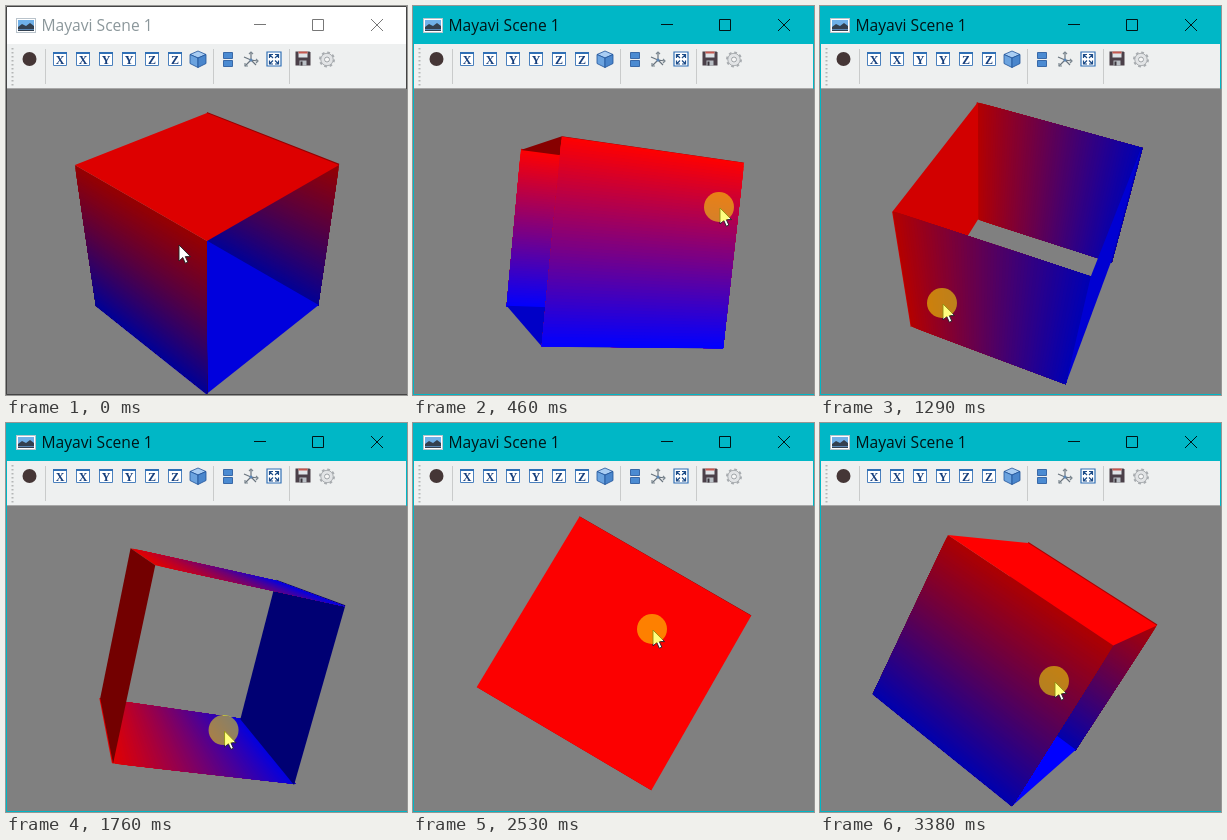
An HTML page with a canvas that plays this animation: 401x389 px, repeating every 3.46 s.

```html
<!DOCTYPE html>
<html lang="en">
<head>
<meta charset="utf-8">
<title>Mayavi Scene 1</title>
<style>
  html, body { margin: 0; width: 100%; height: 100%; overflow: hidden; }
  #win { position: relative; width: 401px; height: 389px; --edge: #444; --bar: #fff; --text: #8b979b; --ctl: #777; }
  #win.active { --edge: #00b7c6; --bar: #00b7c6; --text: #001416; --ctl: #001416; }
  canvas, svg { position: absolute; left: 0; top: 0; display: block; }
  .title { font: 15.6px "Open Sans", "Noto Sans", sans-serif; fill: var(--text); }
  .axis { font: bold 12px "Liberation Serif", "Noto Serif", serif; fill: #173f7c; text-anchor: middle; }
</style>
</head>
<body>
<div id="win">
  <canvas width="401" height="389"></canvas>
  <svg width="401" height="389" viewBox="0 0 401 389">
    <defs>
      <g id="axisBox">
        <rect x="-7" y="-7" width="14" height="14" fill="#fff"/>
        <path d="M-6.500 -6.500H6.500V6.500H-6.500Z" fill="none" stroke="#4a80bd"/>
        <path d="M-7 -6H7" stroke="#2f6fb5" stroke-width="2"/>
      </g>
    </defs>
    <rect width="401" height="38" style="fill:var(--bar)"/>
    <rect y="38" width="401" height="45" fill="#eef0f0"/>
    <path d="M0 82.500H401" stroke="#a8a8a8"/>

    <g>
      <rect x="10.500" y="12.500" width="19" height="14" fill="#fff" stroke="#b9c3cb"/>
      <rect x="12" y="14" width="16" height="11" fill="#6fb0e8"/>
      <path d="M12 21l4-3 4 2 4-3 4 3v5H12z" fill="#33404f"/>
      <path d="M12 23.500h16" stroke="#5a87b5"/>
    </g>
    <text class="title" x="35.500" y="25">Mayavi Scene 1</text>
    <path d="M248 18.500H260M306.500 13.500h11v11h-11zM365 13l12 12M377 13l-12 12" fill="none" style="stroke:var(--ctl)"/>

    <path d="M6.500 42V81" stroke="#b4b6b6" stroke-width="2" stroke-dasharray="1.500 2.500"/>
    <path d="M39.500 43V78M207.500 43V78M283.500 43V78" stroke="#c9cbcb"/>
    <circle cx="23.500" cy="53" r="7" fill="#453636"/>
    <g id="axes"></g>

    <g stroke="#20549a" stroke-width=".8" stroke-linejoin="round">
      <path d="M192 45l8 3.500-8 3.500-8-3.500z" fill="#a9cdf3"/>
      <path d="M184 48.500l8 3.500v9.500l-8-4z" fill="#6ba3df"/>
      <path d="M200 48.500l-8 3.500v9.500l8-4z" fill="#4a86cc"/>
      <path d="M217.500 46.500h9v6h-9zM217.500 54.500h9v6h-9z" fill="#4b8bd2"/>
    </g>
    <g stroke="#6a757f" stroke-width="1.200" fill="none">
      <path d="M245 46v8l7 1M245 54l-6 6M245 54l-7-3M245 54l5 5"/>
      <path d="M243 48l2-2 2 2M250 53l2 2-2 2M239 57v3h3" stroke="#7b8790"/>
      <circle cx="245" cy="54" r="1.500" fill="#5a85b5" stroke="none"/>
    </g>
    <path d="M261 46h14v14h-14z" fill="#fff" stroke="#2f6fb5" stroke-width="1.200"/>
    <path d="M263.500 52v-3.500h3.500M269 48.500h3.500V52M272.500 54.500V58H269M267 58h-3.500v-3.500M264 49l3 3M272 49l-3 3M272 57.500l-3-3M264 57.500l3-3" fill="none" stroke="#1d4c88" stroke-width="1.200"/>
    <g transform="translate(-.5 -.5)">
      <path d="M290 46h14l1 1v13h-15z" fill="#4b4049"/>
      <path d="M293 46h9v6h-9z" fill="#dfe4e8"/>
      <path d="M293 46h9v2h-9z" fill="#c4574e"/>
      <path d="M294 55h7v5h-7z" fill="#b9bfc5"/>
      <path d="M295 56h2v4h-2z" fill="#3a343b"/>
    </g>
    <g fill="none">
      <circle cx="321" cy="53.500" r="7" stroke="#a8acb0" stroke-width="2" stroke-dasharray="2.750"/>
      <circle cx="321" cy="53.500" r="4.600" stroke="#e2e4e6" stroke-width="3"/>
      <circle cx="321" cy="53.500" r="6.200" stroke="#a9adb0"/>
      <circle cx="321" cy="53.500" r="2.500" fill="#f5f5f5" stroke="#9da2a6"/>
    </g>

    <g id="pointer">
      <path d="M0 0V16L3.800 12.500L6.300 18.200L8.800 17.100L6.300 11.600H11.500Z" fill="#fff" stroke="#222" stroke-width=".9"/>
      <circle id="halo" cx="-1" cy="-1" r="15" fill="#ff0" fill-opacity=".5"/>
    </g>
    <path d="M400.500 83V.5H.5V388.500H401" fill="none" style="stroke:var(--edge)"/>
  </svg>
</div>
<script>
const LOOP = 3460, STEPS = 45;
const CX = 201, CY = 235.2, FOCAL = 571, DIST = 6.69, BANDS = 64;
const LIP = 1.012; // far walls reach slightly past the near ones

// step, orientation (w x y z), pointer tip
const KEYS = [
  [0, 0.340, -0.176, -0.425, -0.8205, 173, 239],
  [6, 0.575, -0.5835, -0.3626, -0.4435, 307, 202],
  [12, 0.868, -0.1127, -0.1179, -0.4693, 312, 311],
  [17, 0.525, 0.2096, -0.7473, -0.3496, 123, 298],
  [26, 0.422, 0.4256, -0.189, -0.7796, 268, 302],
  [33, 0.497, -0.0214, -0.0283, -0.8669, 240, 207],
  [44, 0.304, -0.4476, -0.3567, -0.7587, 235, 259]
];

// direction and strength of the lights in view space
const LIGHTS = [
  [0.5, 0.707, 0.5, 1],
  [-0.75, -0.5, 0.433, 0.6],
  [0.75, -0.5, 0.433, 0.5]
];

const win = document.getElementById('win');
const pointer = document.getElementById('pointer');
const halo = document.getElementById('halo');
const ctx = document.querySelector('canvas').getContext('2d');

document.getElementById('axes').innerHTML = [...'XXYYZZ'].map((c, i) =>
  `<g transform="translate(${54 + 23 * i} 53)"><use href="#axisBox"/><text class="axis" y="5">${c}</text></g>`
).join('');

function slope(i, c) {
  const a = KEYS[Math.max(i - 1, 0)], b = KEYS[Math.min(i + 1, KEYS.length - 1)];
  return (b[c] - a[c]) / (b[0] - a[0]);
}

// Hermite spline through the keys
function sample(step) {
  let i = 0;
  while (i < KEYS.length - 2 && step >= KEYS[i + 1][0]) i++;
  const a = KEYS[i], b = KEYS[i + 1], span = b[0] - a[0];
  const u = (step - a[0]) / span, v = 1 - u;
  return a.slice(1).map((p, k) => {
    const c = k + 1;
    return v * v * (1 + 2 * u) * p + u * u * (3 - 2 * u) * b[c]
      + span * u * v * (v * slope(i, c) - u * slope(i + 1, c));
  });
}

// object axes in view space
function axesOf(q) {
  const n = Math.hypot(...q);
  const [w, x, y, z] = q.map(v => v / n);
  return [
    [1 - 2 * (y * y + z * z), 2 * (x * y + w * z), 2 * (x * z - w * y)],
    [2 * (x * y - w * z), 1 - 2 * (x * x + z * z), 2 * (y * z + w * x)],
    [2 * (x * z + w * y), 2 * (y * z - w * x), 1 - 2 * (x * x + y * y)]
  ];
}

function project(axes, p) {
  const [x, y, z] = [0, 1, 2].map(k => p[0] * axes[0][k] + p[1] * axes[1][k] + p[2] * axes[2][k]);
  const s = FOCAL / (DIST - z);
  return [CX + x * s, CY - y * s];
}

function brightness(n) {
  const sum = LIGHTS.reduce((s, l) => s + l[3] * Math.max(0, n[0] * l[0] + n[1] * l[1] + n[2] * l[2]), 0);
  return 255 * Math.min(1, sum);
}

function fillQuad(axes, corners, color) {
  ctx.fillStyle = color;
  ctx.beginPath();
  corners.forEach(p => ctx.lineTo(...project(axes, p)));
  ctx.fill();
}

const shade = (mix, light) => `rgb(${light * mix},0,${light * (1 - mix)})`;

function drawFace(axes, { axis, side, front }) {
  const flip = front ? side : -side;
  const reach = front ? 1 : LIP;
  const light = brightness(axes[axis].map(v => v * flip));
  if (axis === 2) {
    fillQuad(axes, [[-reach, -1, side], [reach, -1, side], [reach, 1, side], [-reach, 1, side]],
      shade(side > 0 ? 1 : 0, light));
    return;
  }
  // every band extends to the far edge so no seams show
  for (let i = 0; i < BANDS; i++) {
    const z = reach * (1 - 2 * i / BANDS);
    fillQuad(axes, [[side, -1, z], [side, 1, z], [side, 1, -reach], [side, -1, -reach]],
      shade(1 - (i + 0.5) / BANDS, light));
  }
}

// a tube: the two faces across the y axis are open
function drawCube(axes) {
  ctx.fillStyle = '#808080';
  ctx.fillRect(0, 83, 401, 306);
  const faces = [];
  for (const axis of [0, 2]) {
    for (const side of [1, -1]) faces.push({ axis, side, front: axes[axis][2] * side * DIST > 1 });
  }
  faces.sort((a, b) => a.front - b.front).forEach(f => drawFace(axes, f));
}

let shown = -1;
function tick(now) {
  const t = now % LOOP;
  const step = Math.min(STEPS - 1, Math.floor((t + 18) * STEPS / LOOP));
  if (step !== shown) {
    shown = step;
    const s = sample(step);
    drawCube(axesOf(s.slice(0, 4)));
    pointer.setAttribute('transform', `translate(${s[4]} ${s[5]})`);
    halo.style.display = step ? '' : 'none';
    win.classList.toggle('active', step > 0);
  }
  requestAnimationFrame(tick);
}
tick(0);
</script>
</body>
</html>
```
